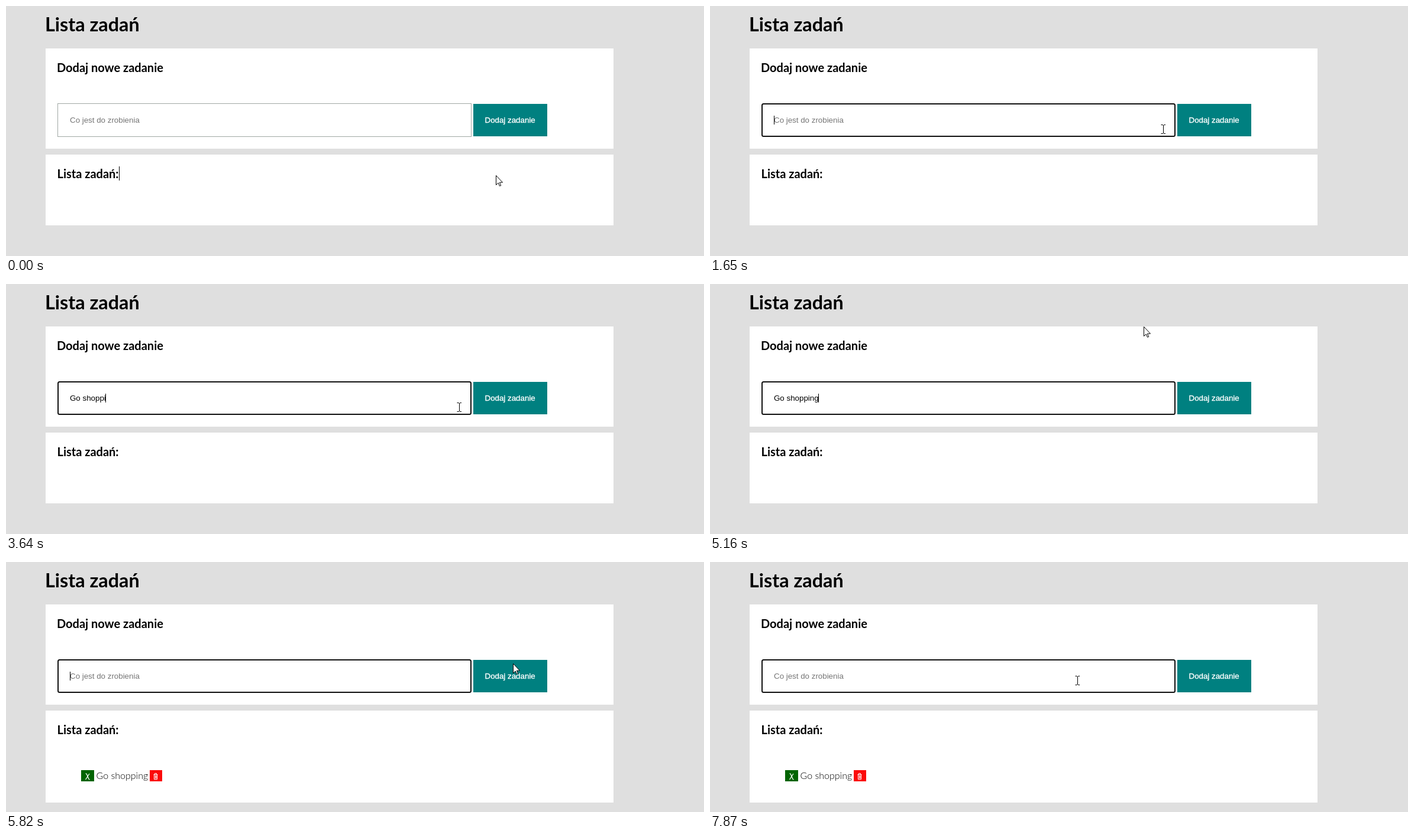
Write an HTML page that moves like this. It is 1180x424 px and loops after 8000 ms.

```html
<!DOCTYPE html>
<html lang="pl">
<head>
<meta charset="utf-8">
<title>Lista zadań</title>
<style>
  html, body { margin: 0; width: 100%; height: 100%; overflow: hidden; background: #dfdfdf; }
  svg { display: block; }
  text { white-space: pre; }
  .heading { font: 700 20px Lato, sans-serif; }
  .title { font-size: 32.3px; }
  .item { font: 300 16px Lato, sans-serif; }
  .form { font: 13.333px "Liberation Sans", Arial, sans-serif; }
  .icon { fill: none; stroke: #fff; }
</style>
</head>
<body>
<svg width="1180" height="424" viewBox="0 0 1180 424">
  <text class="heading title" x="66" y="43">Lista zadań</text>

  <rect x="67" y="72" width="960" height="170" fill="#fff"/>
  <text class="heading" x="86" y="112">Dodaj nowe zadanie</text>
  <rect id="blurred" x="87.5" y="165.5" width="699" height="56" fill="#fff" stroke="#a0a8a4"/>
  <rect id="focused" x="88" y="166" width="698" height="55" rx="2.5" fill="#fff" stroke="#101010" stroke-width="2"/>
  <text id="field" class="form" x="108" y="198"></text>
  <rect id="caret" y="186" width="1" height="15"/>
  <rect x="790" y="166" width="125" height="55" fill="#008080"/>
  <text id="button" class="form" x="809.5" y="198" fill="#fff" stroke="#fff">Dodaj zadanie</text>

  <rect id="list" x="67" y="252" width="960" height="120" fill="#fff"/>
  <text class="heading" x="86.5" y="292">Lista zadań:</text>
  <rect id="pageCaret" x="191" y="272" width="1" height="24"/>
  <g id="task">
    <rect x="127" y="353" width="22" height="19" fill="#006400"/>
    <path class="icon" stroke-width="1.3" d="M134.5 359q1.5-.5 2.2 1.5l3 7q.7 1.5 1.8 1.2M141 359l-6.5 10"/>
    <text class="item" x="152.5" y="368">Go shopping</text>
    <rect x="243" y="353" width="21" height="19" fill="#fb0a0a"/>
    <path class="icon" d="M249.5 360.5h7M251.5 360v-1.5h3v1.5M250.5 361v7.5h5V361M252.5 362v5M254 362v5"/>
  </g>

  <circle id="click" r="12" fill="#ffff80"/>
  <path id="arrow" d="M.5.5V16.5L4.2 13L6.5 18.3L8.7 17.5L6.4 12.2H11.5Z" fill="#fff" stroke="#000"/>
  <path id="beam" d="M-3.5-7.5H-1L.5-6.5L2-7.5H4M.5-6.5V6.5M-3.5 7.5H-1L.5 6.5L2 7.5H4" fill="none" stroke="#000"/>
</svg>
<script>
const LOOP = 8000, BLINK = 530, CLICK = 70;
const FOCUSED = 590, BLURRED = 5690, ADDED = 5820;
const TASK = 'Go shopping', HINT = 'Co jest do zrobienia';
const FIRST_KEY = 1790, KEY_GAP = 220;

// Key points of the pointer's path.
const stops = [
  { t: 60, x: 828, y: 287 },
  { t: FOCUSED, x: 717, y: 200 },
  { t: 790, x: 766, y: 209 },
  { t: 4900, x: 766, y: 209 },
  { t: 5160, x: 733, y: 70 },
  { t: 5490, x: 848, y: 273 },
  { t: 5760, x: 857, y: 172 },
  { t: 5850, x: 857, y: 172 },
  { t: 6480, x: 621, y: 201 }
];

const el = Object.fromEntries([...document.querySelectorAll('[id]')].map(e => [e.id, e]));
const show = (e, on) => e.style.display = on ? '' : 'none';
const move = (e, x, y) => e.setAttribute('transform', `translate(${x} ${y})`);
const within = (v, a, b) => v >= a && v < b;
const clamp = (v, a, b) => Math.min(b, Math.max(a, v));
const mix = (a, b, p) => Math.round(a + (b - a) * p);
const easeInOut = p => p * p * (3 - 2 * p);
const easeOut = p => 1 - (1 - p) ** 3;

// Different easing on each axis bends the path into an arc.
function pointerAt(t) {
  const next = stops.findIndex(s => s.t > t);
  if (next < 1) return next ? stops.at(-1) : stops[0];
  const a = stops[next - 1], b = stops[next];
  const p = (t - a.t) / (b.t - a.t);
  return { x: mix(a.x, b.x, easeInOut(p)), y: mix(a.y, b.y, easeOut(p)) };
}

const ruler = document.createElement('canvas').getContext('2d');
ruler.font = '13.333px "Liberation Sans", Arial, sans-serif';

function draw(t) {
  const added = t >= ADDED;
  const focus = added || within(t, FOCUSED, BLURRED);
  const count = clamp(Math.floor((t - FIRST_KEY) / KEY_GAP) + 1, 0, TASK.length);
  const typed = added ? '' : TASK.slice(0, count);

  show(el.focused, focus);
  show(el.blurred, !focus);
  el.field.textContent = typed || HINT;
  el.field.setAttribute('fill', typed ? '#000' : '#757575');

  // Each keystroke or focus restarts the caret's blink.
  const restart = added ? ADDED - 60 : count ? FIRST_KEY + (count - 1) * KEY_GAP : FOCUSED;
  show(el.caret, focus && Math.floor((t - restart) / BLINK) % 2 === 0);
  el.caret.setAttribute('x', Math.floor(108 + ruler.measureText(typed).width));

  show(el.pageCaret, t < FOCUSED);
  show(el.task, added);
  el.list.setAttribute('height', added ? 156 : 120);

  const { x, y } = pointerAt(t);
  const overField = within(x, 87, 787) && within(y, 165, 222);
  const overButton = within(x, 790, 915) && within(y, 166, 221);
  el.button.setAttribute('stroke-width', overButton && !added ? 0 : 0.35);
  show(el.beam, overField);
  show(el.arrow, !overField);
  move(overField ? el.beam : el.arrow, x, y);
  show(el.click, [FOCUSED, BLURRED].some(c => within(t, c, c + CLICK)));
  move(el.click, x - 2, y - 1);
}

const start = performance.now();
function tick(now) {
  draw(Math.max(0, now - start) % LOOP);
  requestAnimationFrame(tick);
}
draw(0);
requestAnimationFrame(tick);
</script>
</body>
</html>
```
